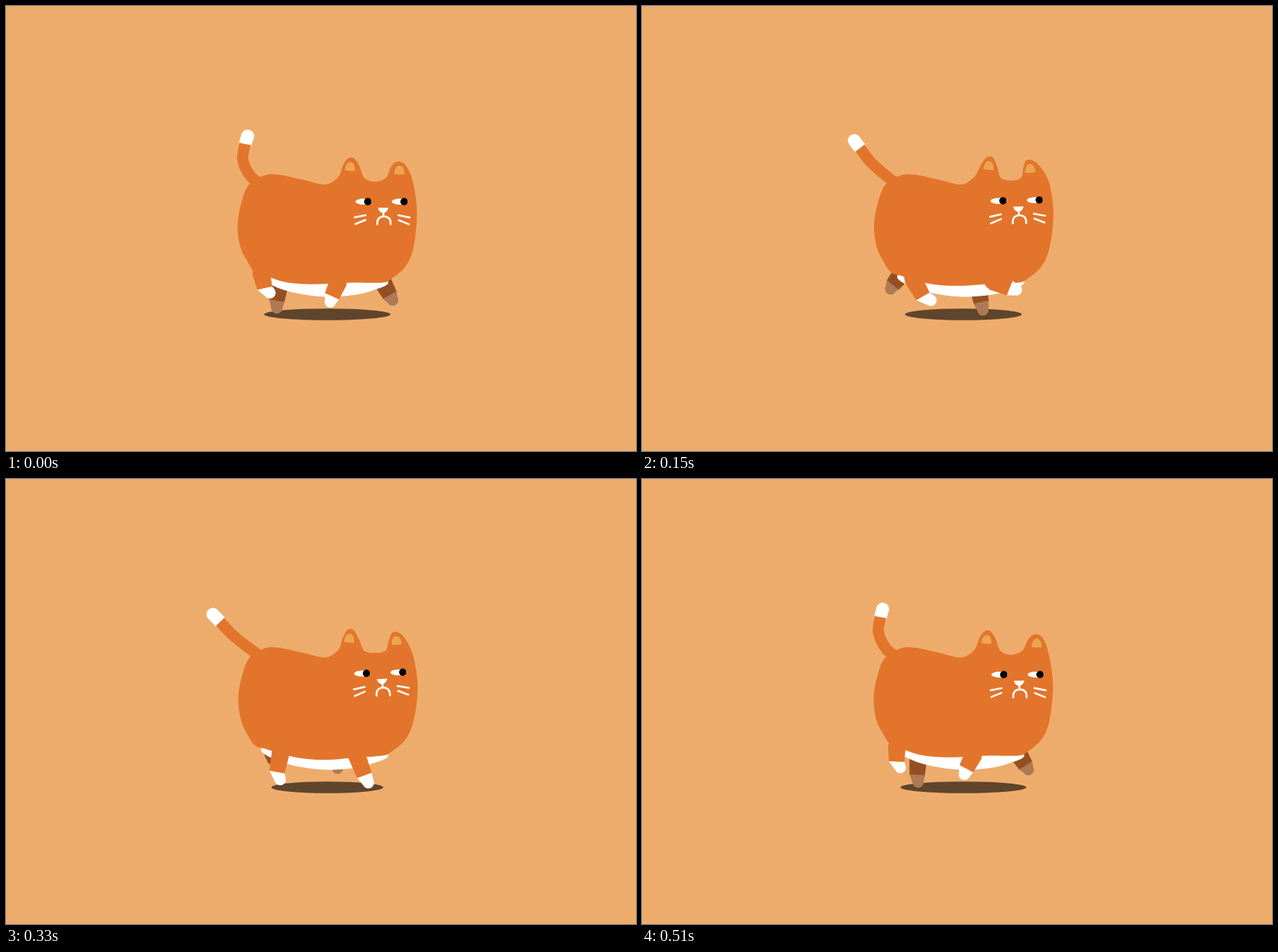
An HTML page with a canvas for the animation above (0.54 s loop, 842x596 px).

```html
<!DOCTYPE html>
<html>
<head>
<meta charset="utf-8">
<title>Walking cat</title>
<style>
html, body { margin: 0; width: 100%; height: 100%; overflow: hidden; background: #eeac6c; }
canvas { display: block; }
</style>
</head>
<body>
<canvas id="stage" width="842" height="596"></canvas>
<script>
const ctx = document.getElementById('stage').getContext('2d');
const LOOP = 540, STEP = 30;
const BACK = '#eeac6c', ORANGE = '#e2752b', WHITE = '#fff', BROWN = '#945022',
  DARK_PAW = '#ad7a55', SHADOW = '#5e452c', EAR = '#eda44f';

// Angles in degrees of the cycle. The hip sways around x, y; the leg swings from
// back to front after lift, then drags back; its length peaks at the phase long.
const nearRear = { x: 356.5, y: 362, slope: 0.4, sway: 16, peak: 172, back: -47, front: 42,
  lift: 290, swing: 130, drag: 2, length: 31, reach: 12, long: 150, power: 2, bend: 10 };
const nearFront = { x: 460, y: 368.5, slope: 0, sway: 16.5, peak: 160, back: -31, front: 70,
  lift: 355, swing: 106, drag: 1, length: 30, reach: 14, long: 185, power: 2, bend: 2 };
const farRear = { x: 357, y: 366, slope: 0.4, sway: 14, peak: -48, back: -36, front: 28,
  lift: 100, swing: 178, drag: 0.75, length: 4, reach: 31, long: 350, power: 0.5, bend: 3 };
const farFront = { x: 463, y: 369, slope: 0, sway: 41, peak: -12, back: 0, front: 32,
  lift: 170, swing: 170, drag: 1, length: 8, reach: 31, long: 90, power: 0.6, bend: 0 };

const rad = degrees => degrees * Math.PI / 180;
const cos = degrees => Math.cos(rad(degrees));
const sin = degrees => Math.sin(rad(degrees));
const mix = (a, b, k) => a + (b - a) * k;

// Curve through flat x, y pairs
function curve(flat, closed) {
  const n = flat.length / 2;
  const at = i => {
    i = closed ? (i + n) % n : Math.max(0, Math.min(n - 1, i));
    return [flat[2 * i], flat[2 * i + 1]];
  };
  const path = new Path2D();
  path.moveTo(...at(0));
  for (let i = 0; i < (closed ? n : n - 1); i++) {
    const [a, b, c, d] = [at(i - 1), at(i), at(i + 1), at(i + 2)];
    path.bezierCurveTo(b[0] + (c[0] - a[0]) / 6, b[1] + (c[1] - a[1]) / 6,
      c[0] - (d[0] - b[0]) / 6, c[1] - (d[1] - b[1]) / 6, c[0], c[1]);
  }
  return path;
}

function fill(path, color) {
  ctx.fillStyle = color;
  ctx.fill(path);
}

function stroke(path, color, width, cap = 'butt') {
  ctx.strokeStyle = color;
  ctx.lineWidth = width;
  ctx.lineCap = cap;
  ctx.stroke(path);
}

function ellipse(x, y, rx, ry, color) {
  const path = new Path2D();
  path.ellipse(x, y, rx, ry, 0, 0, 2 * Math.PI);
  fill(path, color);
}

// Limb segment of changing half width; a1 and a2 are the directions at its ends
function taper(x1, y1, a1, w1, x2, y2, a2, w2, color) {
  const nx1 = cos(a1) * w1, ny1 = -sin(a1) * w1, nx2 = cos(a2) * w2, ny2 = -sin(a2) * w2;
  fill(new Path2D(`M${x1 + nx1} ${y1 + ny1}L${x2 + nx2} ${y2 + ny2}
    ${x2 - nx2} ${y2 - ny2} ${x1 - nx1} ${y1 - ny1}Z`), color);
}

function stride(leg, phase) {
  const p = (phase - leg.lift + 360) % 360;
  return p < leg.swing
    ? mix(leg.front, leg.back, (1 - p / leg.swing) ** 2)
    : mix(leg.front, leg.back, ((p - leg.swing) / (360 - leg.swing)) ** leg.drag);
}

function drawLeg(leg, phase, color, pawColor) {
  const shift = leg.sway * cos(phase - leg.peak);
  const hx = leg.x + shift, hy = leg.y + leg.slope * shift;
  const length = leg.length + leg.reach * ((1 + cos(phase - leg.long)) / 2) ** leg.power;
  const angle = stride(leg, phase), shin = angle - leg.bend;
  const ax = hx + 0.73 * length * sin(shin), ay = hy + 0.73 * length * cos(shin);
  const px = hx + length * sin(angle), py = hy + length * cos(angle);
  const toe = angle + 2 * leg.bend;
  taper(ax, ay, shin, 10.3, px, py, toe, 7.6, pawColor);
  ellipse(px, py, 7.6, 7.6, pawColor);
  taper(hx, hy, shin, 12, ax, ay, shin, 10.3, color);
  ellipse(hx, hy, 11, 11, color);
}

function drawTail(phase) {
  const s = (1 - cos(phase + 14 * sin(phase / 2))) / 2;
  const tx = mix(323, 265, s), ty = mix(174, 183, s);
  const ex = mix(319.5, 278, s), ey = mix(185, 193, s);
  stroke(new Path2D(`M${ex} ${ey}L${tx} ${ty}`), WHITE, 17);
  ellipse(tx, ty, 8.6, 8.6, WHITE);
  stroke(curve([ex, ey, mix(316.5, 301, s), mix(206, 211, s), 327, 228, 345, 241]), ORANGE, 15);
}

function drawBody(phase, sway) {
  const lx = 462.3 + 2 * cos(phase) - 3 * cos(2 * phase), ly = 203 - 2 * sway;
  const rx = 521.5 + 5 * cos(phase) - 5 * sin(phase) - 2 * cos(2 * phase), ry = 208 - 4 * sway;
  const dl = (lx - 462) * 0.6, dr = (rx - 525) * 0.6, edge = sway;
  fill(curve([341, 363, 360, 376, 390, 385, 428, 389.5, 465, 387, 490, 381, 511, 370,
    490, 350, 428, 340, 360, 350], true), WHITE);
  fill(curve([325 + edge, 239, 315 + edge, 262, 309.5 + edge, 293, 313 + edge, 322,
    322, 341, 333, 357, 347, 361.5, 372, 369.5, 400, 372.5 + 2.5 * sway,
    430, 372 + 4.5 * sway, 465, 370.5 + 3 * sway, 503, 370.5,
    515, 365.5, 533, 350, 543, 330, 548 + edge, 300, 549 + edge, 270, 544, 236,
    537 + dr, 217 - 2 * sway, rx + 5, ry + 1.5, rx - 4, ry + 1, 514 + dr, 217, 508 + dr * 0.3, 230,
    493, 235.5 - 3 * sway, 479 + dl * 0.3, 230, 473 + dl, 215, lx + 4, ly + 1, lx - 4, ly + 1,
    451 + dl, 213, 444, 229, 427, 239, 400, 233.5, 365, 226, 345, 227], true), ORANGE);
  drawInnerEar(lx - 1.2, ly + 12, 0.1);
  drawInnerEar(rx + 1.2, ry + 11.8, -0.08 * sway);
}

function drawInnerEar(x, y, turn) {
  ctx.save();
  ctx.translate(x, y);
  ctx.rotate(turn);
  fill(new Path2D('M-6.8 5.5C-6.5 -2 -4 -6 0 -6C4 -6 6.5 -2 6.8 5.5Q0 6.3 -6.8 5.5Z'), EAR);
  ctx.restore();
}

function drawFace(sway) {
  ctx.save();
  ctx.translate(483.5 - 2 * sway, 262 - 2 * sway);
  ctx.rotate(-0.035 * sway);
  for (const x of [0, 48.5]) {
    ellipse(x - 5.5, 0, 11, 4, WHITE);
    ellipse(x, 0, 4.9, 4.9, '#000');
  }
  fill(new Path2D('M13.5 8.2H27.5Q26 14.5 20.8 15.3Q15 14.5 13.5 8.2Z'), WHITE);
  stroke(new Path2D(`M20.9 14V20M12.7 30.5V28C12.7 17 30.5 17 30.5 28V30.5
    M-17.5 21L-3 18.2M-16.5 30L-3 24.5M41 18.2L56 21.2M41.5 24.8L55 30.3`), WHITE, 2.5, 'round');
  ctx.restore();
}

function draw(now) {
  const phase = Math.floor(now % LOOP / STEP) * STEP / LOOP * 360;
  const sway = (1 - cos(phase)) / 2;
  ctx.fillStyle = BACK;
  ctx.fillRect(0, 0, 842, 596);
  ellipse(429.5, 413, 84.5 - 11 * sway, 7.8, SHADOW);
  drawLeg(farRear, phase, BROWN, DARK_PAW);
  drawLeg(farFront, phase, BROWN, DARK_PAW);
  drawTail(phase);
  drawBody(phase, sway);
  drawLeg(nearRear, phase, ORANGE, WHITE);
  drawLeg(nearFront, phase, ORANGE, WHITE);
  drawFace(sway);
}

const start = performance.now();
function tick() {
  draw(performance.now() - start);
  requestAnimationFrame(tick);
}
tick();
</script>
</body>
</html>
```
